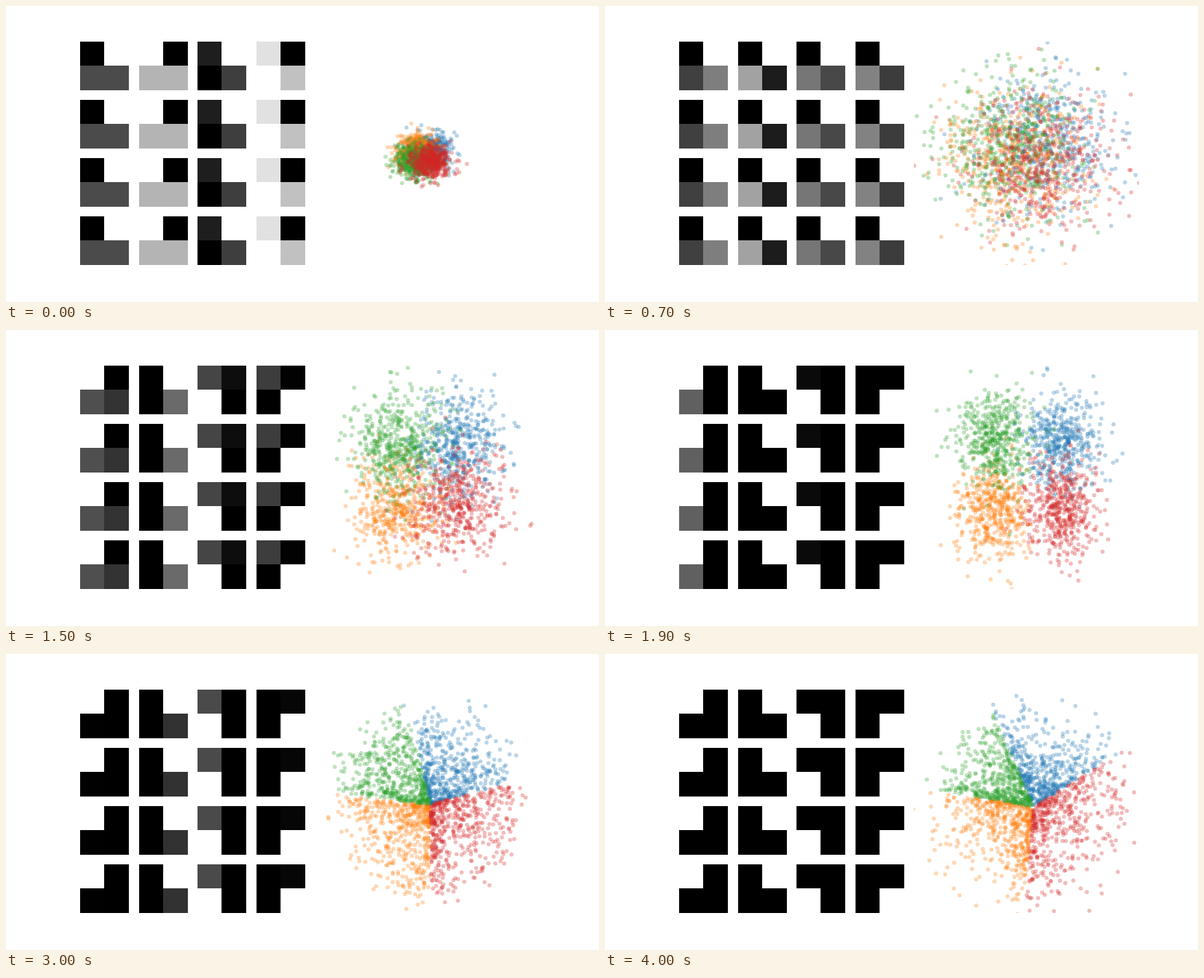
Write an HTML page with a canvas that moves like this. It is 864 px wide and 432 px high and loops after 4100 ms.

```html
<!DOCTYPE html>
<html lang="en">
<head>
<meta charset="utf-8">
<title>Latent space training</title>
<style>
  html, body { margin: 0; width: 100%; height: 100%; overflow: hidden; background: #fff; }
  canvas { display: block; width: 864px; height: 432px; }
</style>
</head>
<body>
<canvas id="stage" width="864" height="432"></canvas>
<script>
const ctx = document.getElementById('stage').getContext('2d');
const STEP = 100, STEPS = 41, POINTS = 500;

// In drawing order; q is the sector, counted anticlockwise from the upper right.
const classes = [
  { color: '#1f77b4', q: 0 },
  { color: '#ff7f0e', q: 2 },
  { color: '#2ca02c', q: 1 },
  { color: '#d62728', q: 3 }
];

const tones = [
  { at: 0, level: opposites([0, 255, 75, 75], [30, 255, 0, 62]) },
  { at: 7, level: blurred([64, 162, 118, 130]) },
  { at: 11, level: solved([62, 212, 128, 4], [102, 0, 25, 122]) },
  { at: 19, level: solved([96, 0, 10, 0]) },
  { at: 25, level: solved([2, 100, 148, 12]) },
  { at: 35, level: solved() }
];

const clouds = [
  { at: 0,  place: blobs([608, 220], [10, 0], [15, 13], 7) },
  { at: 7,  place: blobs([613, 216], [24, 14], [51, 51]) },
  { at: 11, place: blobs([616, 211], [40, 39], [38, 40]) },
  { at: 19, place: blobs([615, 212], [49, 50], [27, 36]) },
  { at: 25, place: sectors([613, 217], [-1, 94, 176, 275], 0.25, boxed) },
  { at: 35, place: sectors([624, 223], [32, 113, 170, 265], 0.6, fading) }
];

const lerp = (a, b, p) => a + (b - a) * p;
const unit = g => 1 / (1 + Math.exp(-1.702 * g));

// Every second tile is the negative of the one before.
function opposites(...pair) {
  return (col, i) => {
    const v = pair[col >> 1][i];
    return col % 2 ? 255 - v : v;
  };
}

// Black and white on top, two related greys below.
function blurred(greys) {
  return (col, i) => [0, 255, greys[col], 190 - greys[col]][i];
}

// One white corner per tile, with some grey left below or above it and diagonally.
function solved(vertical = [], diagonal = []) {
  return (col, i) => {
    const rest = { [col]: 255, [col ^ 2]: vertical[col], [col ^ 3]: diagonal[col] };
    return rest[i] || 0;
  };
}

// Four normal clouds around a centre; twist moves opposite clouds up or down together.
function blobs([cx, cy], spread, size, twist = 0) {
  return (q, g, h) => {
    const a = (q + 0.5) * Math.PI / 2, c = Math.cos(a), s = Math.sin(a);
    const right = Math.sign(c), up = Math.sign(s);
    return [
      cx + right * spread[0] + size[0] * (h * c - g * s),
      cy - up * spread[1] - right * up * twist - size[1] * (h * s + g * c)
    ];
  };
}

// Four wedges between rays; edge is how strongly points gather along the rays.
function sectors([cx, cy], rays, edge, offset) {
  return (q, g, h) => {
    const v = unit(g);
    const w = lerp(v, 0.5 - 0.5 * Math.cos(Math.PI * v), edge);
    const end = q < 3 ? rays[q + 1] : rays[0] + 360;
    const a = lerp(rays[q], end, w) * Math.PI / 180;
    const [dx, dy] = offset(unit(h), Math.cos(a), Math.sin(a));
    return [cx + dx, cy - dy];
  };
}

// A rounded square that narrows towards the bottom.
function boxed(v, c, s) {
  const r = 124 * v ** 0.9 / (c ** 6 + s ** 6) ** (1 / 6);
  return [r * c * (1 + Math.min(0, r * s) / 650), r * s];
}

function fading(v, c, s) {
  const r = 76 * (-Math.log(1 - v)) ** 0.55;
  return [r * c, r * s];
}

function random(seed) {
  let s = seed;
  return () => {
    s = s + 0x6D2B79F5 | 0;
    let t = Math.imul(s ^ s >>> 15, 1 | s);
    t = t + Math.imul(t ^ t >>> 7, 61 | t) ^ t;
    return ((t ^ t >>> 14) >>> 0) / 4294967296;
  };
}

function between(keys, step) {
  let i = 0;
  while (i < keys.length - 2 && step >= keys[i + 1].at) i++;
  const a = keys[i], b = keys[i + 1];
  return [a, b, Math.min(1, (step - a.at) / (b.at - a.at))];
}

function drawTiles(step) {
  const [a, b, p] = between(tones, step);
  for (let col = 0; col < 4; col++) {
    const mix = [0, 1, 2, 3].map(i => lerp(a.level(col, i), b.level(col, i), p));
    const lo = Math.min(...mix), span = Math.max(...mix) - lo;
    const x = Math.round(108 + 85.5 * col);
    mix.forEach((v, i) => {
      const g = Math.round((v - lo) / span * 255);
      const right = i % 2, low = i >> 1;
      ctx.fillStyle = `rgb(${g},${g},${g})`;
      for (let row = 0; row < 4; row++) {
        ctx.fillRect(x + 35 * right, 52 + 85 * row + 35 * low, 35 + right, 35 + low);
      }
    });
  }
}

function drawClouds(step) {
  const [a, b, p] = between(clouds, step);
  const rnd = random(977 * step + 5);
  ctx.save();
  ctx.beginPath();
  ctx.rect(450, 52, 328, 326);
  ctx.clip();
  ctx.globalAlpha = 0.31;
  for (const { color, q } of classes) {
    ctx.fillStyle = color;
    for (let i = 0; i < POINTS; i++) {
      const m = Math.sqrt(-2 * Math.log(1 - rnd())), t = 2 * Math.PI * rnd();
      const g = m * Math.cos(t), h = m * Math.sin(t);
      const [ax, ay] = a.place(q, g, h), [bx, by] = b.place(q, g, h);
      ctx.beginPath();
      ctx.arc(lerp(ax, bx, p), lerp(ay, by, p), 3, 0, 2 * Math.PI);
      ctx.fill();
    }
  }
  ctx.restore();
}

function draw(step) {
  ctx.fillStyle = '#fff';
  ctx.fillRect(0, 0, 864, 432);
  drawTiles(step);
  drawClouds(step);
}

let shown = 0, start;
function tick(now) {
  start ??= now;
  const step = Math.floor(Math.max(0, now - start) / STEP) % STEPS;
  if (step !== shown) draw(shown = step);
  requestAnimationFrame(tick);
}
draw(0);
requestAnimationFrame(tick);
</script>
</body>
</html>
```
